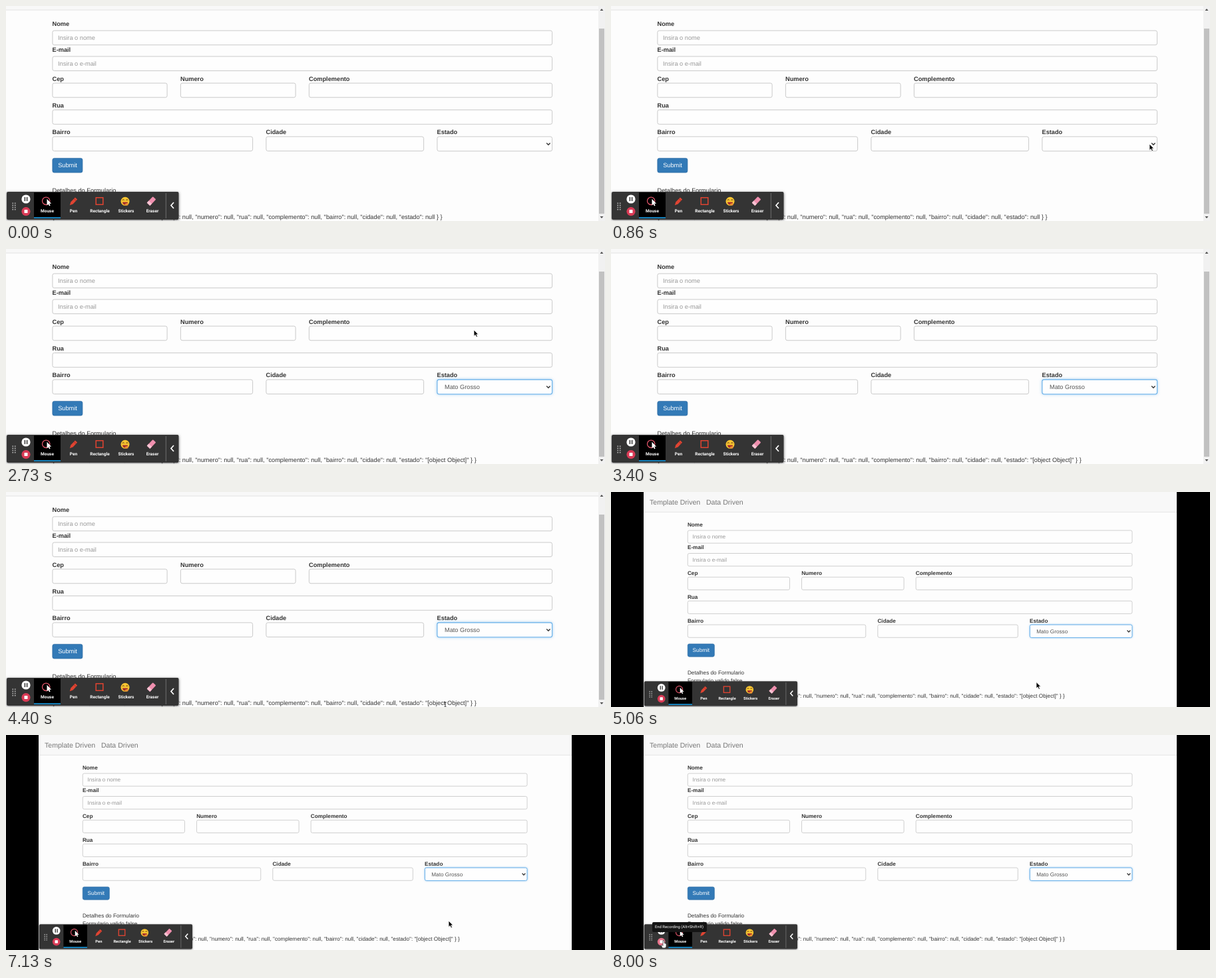
Write an HTML page that moves like this. It is 900 by 324 pixels and loops after 8.06 s.

```html
<!DOCTYPE html>
<html lang="pt">
<head>
<meta charset="utf-8">
<title>Formulario</title>
<style>
  html, body { margin: 0; width: 100%; height: 100%; overflow: hidden; background: #fdfdfd; }
  svg { display: block; width: 900px; height: 324px; }
  text { font: 9.22px "Liberation Sans", Arial, sans-serif; fill: #333; text-rendering: geometricPrecision; white-space: pre; }
  .label { font-weight: 700; }
  .hint { fill: #999; }
  .brand { font-size: 11.86px; fill: #777; }
  .field { fill: #fefefe; stroke: #c4c4c4; stroke-width: .9; }
  .focus .field { stroke: #66afe9; stroke-width: 1.1; filter: drop-shadow(0 0 2px #66afe999); }
  #bar text { font: 700 6.5px Roboto, sans-serif; fill: #fff; text-anchor: middle; }
  #tip text { font: 5.9px Roboto, sans-serif; fill: #fff; text-anchor: middle; }
</style>
</head>
<body>
<svg viewBox="0 0 900 324">
  <rect width="900" height="324" fill="#fdfdfd"/>
  <g id="page">
    <path d="M-10-40H910V6H-10Z" fill="#f8f8f8"/>
    <path d="M-10 6H910" stroke="#e2e2e2"/>
    <text class="brand" x="5.5" y="-6.9">Template Driven</text>
    <text class="brand" x="101" y="-6.9">Data Driven</text>
    <g id="fields"></g>
    <g id="state">
      <rect class="field" x="647.9" y="196.9" width="172.7" height="21.8" rx="2.6"/>
      <text id="choice" x="659" y="211" style="fill:#555"></text>
      <path d="M812.2 206.4l2.7 2.8 2.7-2.8" fill="none" stroke="#333" stroke-width="1.4"/>
    </g>
    <rect x="69.9" y="229.4" width="45" height="21.6" rx="2.6" fill="#337ab7" stroke="#2e6da4" stroke-width=".8"/>
    <text x="92.5" y="243.4" text-anchor="middle" style="fill:#fff">Submit</text>
    <text x="69.5" y="281">Detalhes do Formulario</text>
    <text x="69.5" y="294.2">Formulario valido false</text>
    <text id="json" x="69.5" y="320.7"></text>
  </g>

  <g id="scrollbar">
    <path d="M890 0H900V324H890Z" fill="#f1f1f1"/>
    <path d="M891 34H899V313H891Z" fill="#c1c1c1"/>
    <path d="M892.5 7l2.5-3 2.5 3ZM892.5 317l2.5 3 2.5-3Z" fill="#505050"/>
  </g>
  <path id="sides" d="M0 0H49V324H0ZM850 0H900V324H850Z"/>

  <g id="bar">
    <rect x="1" y="280" width="258.5" height="42" rx="2" fill="#343434" style="filter:drop-shadow(0 1px 2px #0008)"/>
    <path d="M10.3 296.5v11M13.7 296.5v11" stroke="#bbb" stroke-width="1.6" stroke-dasharray="1.6 1.5"/>
    <circle cx="30" cy="291" r="6.6" fill="#fff"/>
    <path d="M28.4 288v6M31.6 288v6" stroke="#333" stroke-width="1.5"/>
    <circle id="stop" cx="30" cy="309.6" r="6.6"/>
    <rect x="27.5" y="307.1" width="5" height="5" rx=".6" fill="#fff"/>
    <path d="M42 281H82V320H42Z"/>
    <path d="M42 319.2H82" stroke="#168fd0" stroke-width="1.8"/>
    <circle cx="60.2" cy="293.8" r="5.7" fill="none" stroke="#df5468" stroke-width="1.3"/>
    <path d="M61.5 290.8v9.6l2.1-2 1.5 3 1.5-.8-1.4-2.8h2.9Z" fill="#fff"/>
    <path d="M95.8 300.3l1.6-5 6.5-6.8 3.2 3-6.5 6.9Z" fill="#e04432"/>
    <path d="M102 290.4l3.3 3.1" stroke="#8f2b22" stroke-width=".8"/>
    <rect x="135.2" y="288.8" width="10.6" height="10.4" fill="none" stroke="#e04432" stroke-width="1.5"/>
    <circle cx="179" cy="294.3" r="6.5" fill="#f8c531"/>
    <path d="M174.7 292.7q1.7-2 3.2 0M180.2 292.7q1.7-2 3.2 0" fill="none" stroke="#5b3816" stroke-width="1"/>
    <path d="M175 295.4h8q-.4 4-4 4t-4-4Z" fill="#a52e2b"/>
    <path d="M179 298.3q2-2 5 0l-1 2.3h-3Z" fill="#ed8e32"/>
    <g transform="rotate(-46 218.5 294)">
      <rect x="212" y="290.8" width="13" height="6.4" rx="1" fill="#ef8fae"/>
      <path d="M212 290.8h4v6.4h-4Z" fill="#f8c4d3"/>
    </g>
    <path d="M240.3 282V320" stroke="#777" stroke-width=".9"/>
    <path d="M252 296l-4 4.5 4 4.5" fill="none" stroke="#fff" stroke-width="1.7"/>
    <g id="tools"></g>
  </g>
  <g id="tip">
    <rect x="62" y="282" width="82" height="15" rx="2" fill="#151515"/>
    <text x="102.5" y="291.4">End Recording (Alt+Shift+R)</text>
  </g>

  <circle id="ring" cx="810" cy="209.3" r="21" fill="none" stroke="#f0a092" stroke-width="2.8"/>
  <g id="pointer">
    <path id="arrow" d="M0 0V9.4L2.2 7.4 3.8 10.8 5.5 10 3.9 6.8H6.8Z" stroke="#fff" stroke-width=".8"/>
    <path id="beam" d="M-1.8-3.5H1.8M0-3.5V3.5M-1.8 3.5H1.8" stroke="#222" stroke-width=".9"/>
    <path id="hand" d="M-1-2.5Q0-4 1-2.5V1L4 2V6L2.8 8.5H-1.8L-3.5 4.5-2.5 3.5-1 5Z" fill="#fff" stroke="#333" stroke-width=".7"/>
  </g>
</svg>
<script>
const LOOP = 8060, ZOOM_OUT = 5060, CHOSEN = 2130, TIP_ON = 7860;
const $ = id => document.getElementById(id);
const show = (id, on) => $(id).style.display = on ? '' : 'none';

// label, left, right, label baseline, input top, placeholder
const fields = [
  ['Nome', 69.5, 821, 30, 36.7, 'Insira o nome'],
  ['E-mail', 69.5, 821, 69, 75.6, 'Insira o e-mail'],
  ['Cep', 69.5, 242.5, 112.5, 115.8],
  ['Numero', 262, 435.5, 112.5, 115.8],
  ['Complemento', 455, 821, 112.5, 115.8],
  ['Rua', 69.5, 821, 153, 156.2],
  ['Bairro', 69.5, 371, 193, 196.5],
  ['Cidade', 390.5, 628, 193, 196.5],
  ['Estado', 647.5, 821, 193]
];
$('fields').innerHTML = fields.map(([name, left, right, base, top, hint = '']) =>
  `<text class="label" x="${left}" y="${base}">${name}</text>` + (top ?
  `<rect class="field" x="${left + .4}" y="${top + .4}" width="${right - left - .8}" height="21.6" rx="2.6"/>
   <text class="hint" x="${left + 8.5}" y="${top + 14.4}">${hint}</text>` : '')).join('');

$('tools').innerHTML = ['Mouse', 'Pen', 'Rectangle', 'Stickers', 'Eraser']
  .map((name, i) => `<text x="${62 + i * 39.5}" y="311.2">${name}</text>`).join('');

const json = state => '{ "nome": null, "email": null, "endereco": { "cep": null, "numero": null, "rua": null, ' +
  `"complemento": null, "bairro": null, "cidade": null, "estado": ${state} } }`;

// Each stretch of pointer movement: [time, x, y]
const moves = [
  [[60, 702, 330], [330, 716, 286], [860, 809, 208], [1130, 809, 208]],
  [[2060, 701, 105], [2460, 701, 105], [2730, 703, 122], [3060, 645, 262], [3260, 634, 275], [3330, 639, 312], [3400, 641, 330]],
  [[3660, 648, 330], [3930, 642, 302], [4400, 660, 320.5], [5060, 660, 320.5]],
  [[5060, 639, 286.5], [5930, 639, 286.5], [6730, 665, 280], [7180, 665, 280], [7730, 110, 306], [7930, 79, 312.5], [8060, 79, 312.5]]
];
function pointerAt(t) {
  const path = moves.find(m => t >= m[0][0] && t < m[m.length - 1][0]);
  if (!path) return null;
  const i = path.findIndex(p => p[0] > t);
  const [t0, x0, y0] = path[i - 1], [t1, x1, y1] = path[i];
  const k = (t - t0) / (t1 - t0), e = k * k * (3 - 2 * k);
  return [x0 + (x1 - x0) * e, y0 + (y1 - y0) * e];
}

function draw(t) {
  const small = t >= ZOOM_OUT, chosen = t >= CHOSEN, tip = t >= TIP_ON;
  $('page').setAttribute('transform', small ? 'translate(53.1 24.9) scale(.8895)' : '');
  $('bar').setAttribute('transform', small ? 'translate(49 36) scale(.89)' : '');
  show('scrollbar', !small);
  show('sides', small);
  show('tip', tip);
  $('stop').setAttribute('fill', tip ? '#e8738b' : '#d93a55');

  $('state').setAttribute('class', t >= 1000 ? 'focus' : '');
  $('choice').textContent = chosen ? 'Mato Grosso' : '';
  $('json').textContent = json(chosen ? '"[object Object]"' : 'null');

  show('ring', t >= 1000 && t < CHOSEN);
  $('ring').setAttribute('r', 21 * Math.min(1, .4 + .6 * (t - 1000) / 130));

  const at = pointerAt(t);
  show('pointer', at);
  if (at) {
    const beam = !small && at[1] > 312;
    $('pointer').setAttribute('transform', `translate(${at})`);
    show('beam', beam);
    show('hand', tip);
    show('arrow', !beam && !tip);
  }
}

const start = performance.now();
function tick() {
  draw((performance.now() - start) % LOOP);
  requestAnimationFrame(tick);
}
tick();
</script>
</body>
</html>
```
